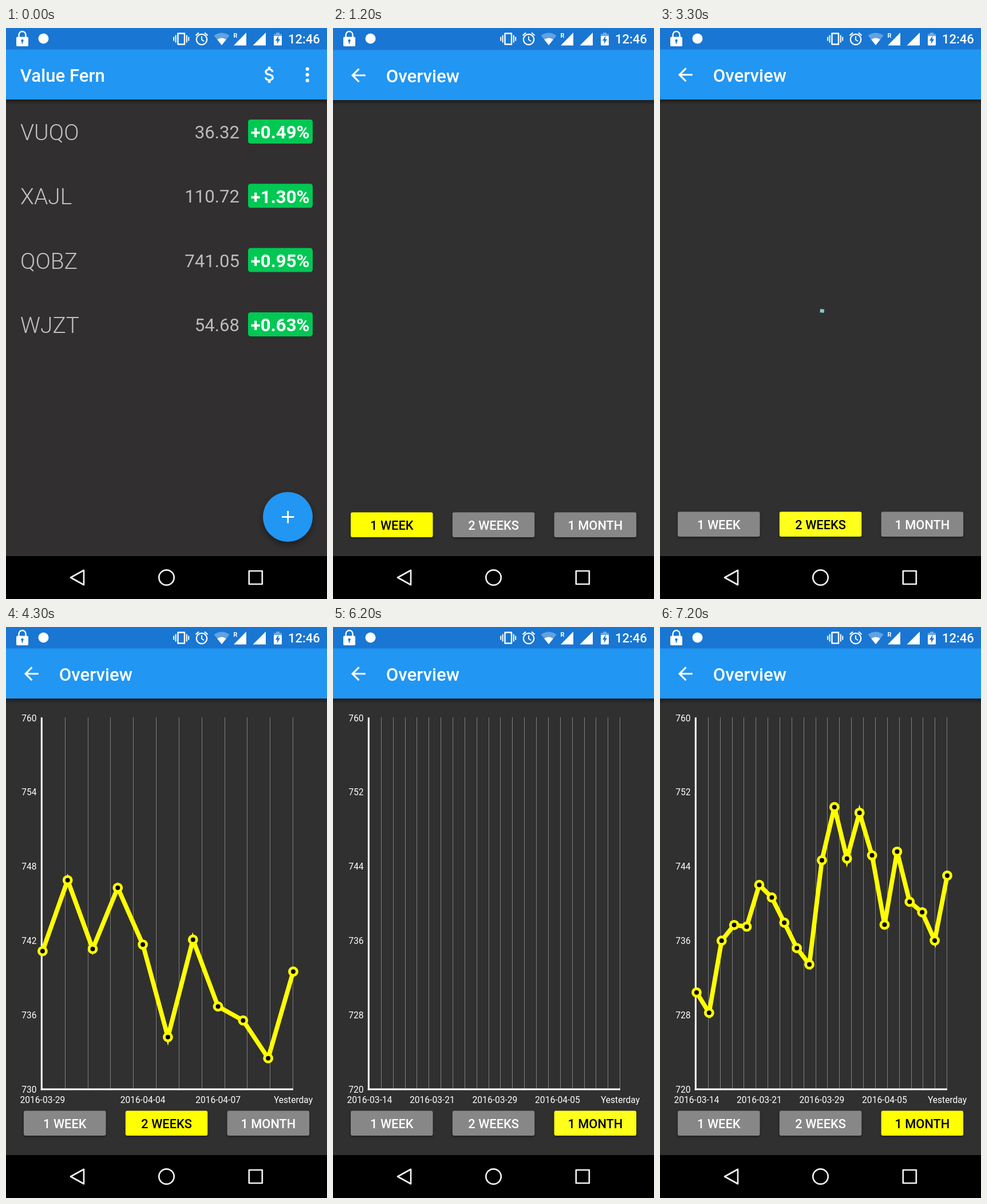
Recreate the animation shown at these times as an HTML page with a canvas. Size 561 by 998 pixels, loop 8000 ms.

```html
<!DOCTYPE html>
<html lang="en">
<head>
<meta charset="utf-8">
<title>Quote overview</title>
<style>
html, body { margin: 0; width: 561px; height: 998px; overflow: hidden; background: #303030; }
canvas { display: block; }
</style>
</head>
<body>
<canvas id="stage" width="561" height="998"></canvas>
<script>
const ctx = document.getElementById('stage').getContext('2d');
const W = 561, H = 998, LOOP = 8000, STEP = 100;
const BLUE = '#2196f3', DARK_BLUE = '#1976d2', YELLOW = '#ffff00', WHITE = '#fff';
const TOP = 159, BOTTOM = 808, RIGHT = 502;

const closes = [730.48, 728.29, 736.06, 737.75, 737.57, 742.07, 740.71, 738, 735.26, 733.5,
  744.72, 750.45, 744.9, 749.84, 745.25, 737.78, 745.65, 740.25, 739.12, 736.07, 743.07];

const stocks = [
  ['VUQO', '36.32', '+0.49%'],
  ['XAJL', '110.72', '+1.30%'],
  ['QOBZ', '741.05', '+0.95%'],
  ['WJZT', '54.68', '+0.63%']
];

// press: button tapped, axes: grid appears, rise: line starts moving
const ranges = [
  { name: '1 WEEK', press: 0, axes: 1300, rise: 1300, count: 6, left: 61.5, low: 730, high: 750,
    labels: { 0: 'Tue', 1: 'Wed', 2: 'Thu', 3: 'Fri', 4: 'Mon', 5: 'Yesterday' } },
  { name: '2 WEEKS', press: 3300, axes: 3600, rise: 3675, count: 11, left: 63.9, low: 730, high: 760,
    labels: { 0: '2016-03-29', 4: '2016-04-04', 7: '2016-04-07', 10: 'Yesterday' } },
  { name: '1 MONTH', press: 5900, axes: 6200, rise: 6350, count: 21, left: 63.9, low: 720, high: 760,
    labels: { 0: '2016-03-14', 5: '2016-03-21', 10: '2016-03-29', 15: '2016-04-05', 20: 'Yesterday' } }
];

const dollar = new Path2D('M11.8 10.9c-2.27-.59-3-1.2-3-2.15 0-1.09 1.01-1.85 2.7-1.85 1.78 0 2.44.85 2.5 2.1h2.21c-.07-1.72-1.12-3.3-3.21-3.81V3h-3v2.16c-1.94.42-3.5 1.68-3.5 3.61 0 2.31 1.91 3.46 4.7 4.13 2.5.6 3 1.48 3 2.41 0 .69-.49 1.79-2.7 1.79-2.06 0-2.87-.92-2.98-2.1h-2.2c.12 2.19 1.76 3.42 3.68 3.83V21h3v-2.15c1.95-.37 3.5-1.5 3.5-3.55 0-2.84-2.43-3.81-4.7-4.4z');
const arrow = new Path2D('M20 11H7.83l5.59-5.59L12 4l-8 8 8 8 1.41-1.41L7.83 13H20v-2z');

const clamp = v => Math.max(0, Math.min(1, v));
const quintInOut = p => p < 0.5 ? 16 * p ** 5 : 1 - 16 * (1 - p) ** 5;

function fastOutSlowIn(x) {
  let lo = 0, hi = 1;
  for (let i = 0; i < 20; i++) {
    const m = (lo + hi) / 2;
    const bx = 1.2 * m * (1 - m) ** 2 + 0.6 * m * m * (1 - m) + m ** 3;
    if (bx < x) lo = m; else hi = m;
  }
  return 3 * lo * lo - 2 * lo ** 3;
}

function rect(x, y, w, h, color) {
  ctx.fillStyle = color;
  ctx.fillRect(x, y, w, h);
}

function rounded(x, y, w, h, r, color) {
  ctx.fillStyle = color;
  ctx.beginPath();
  ctx.roundRect(x, y, w, h, r);
  ctx.fill();
}

function disc(x, y, r, color) {
  ctx.fillStyle = color;
  ctx.beginPath();
  ctx.arc(x, y, r, 0, Math.PI * 2);
  ctx.fill();
}

function ring(x, y, r, width) {
  ctx.lineWidth = width;
  ctx.beginPath();
  ctx.arc(x, y, r, 0, Math.PI * 2);
  ctx.stroke();
}

function trace(points, close) {
  ctx.beginPath();
  points.forEach(([x, y], i) => i ? ctx.lineTo(x, y) : ctx.moveTo(x, y));
  if (close) ctx.closePath();
}

function polygon(points, color) {
  ctx.fillStyle = color;
  trace(points, true);
  ctx.fill();
}

function line(width, ...points) {
  ctx.lineWidth = width;
  trace(points);
  ctx.stroke();
}

function text(s, x, y, size, weight, color, align = 'left') {
  ctx.font = `${weight} ${size}px Roboto, sans-serif`;
  ctx.fillStyle = color;
  ctx.textAlign = align;
  ctx.fillText(s, x, y);
}

function icon(path, x, y) {
  ctx.save();
  ctx.translate(x, y);
  ctx.scale(1.558, 1.558);
  ctx.fillStyle = WHITE;
  ctx.fill(path);
  ctx.restore();
}

function shadow(blur, dy, alpha) {
  ctx.shadowColor = `rgba(0,0,0,${alpha})`;
  ctx.shadowBlur = blur;
  ctx.shadowOffsetY = dy;
}

function noShadow() {
  ctx.shadowColor = 'transparent';
  ctx.shadowBlur = ctx.shadowOffsetY = 0;
}

function wedge(r, color) {
  ctx.fillStyle = color;
  ctx.beginPath();
  ctx.moveTo(377, 30);
  ctx.arc(377, 30, r, -Math.PI / 2 - 0.68, -Math.PI / 2 + 0.68);
  ctx.fill();
}

function statusBar() {
  ctx.strokeStyle = WHITE;
  // lock
  rounded(18, 15.5, 21, 16.5, 2, WHITE);
  ctx.lineWidth = 2.4;
  ctx.beginPath();
  ctx.moveTo(22.5, 16);
  ctx.lineTo(22.5, 12);
  ctx.arc(28.5, 12, 6, Math.PI, 0);
  ctx.lineTo(34.5, 16);
  ctx.stroke();
  disc(28.5, 22, 2.2, DARK_BLUE);
  rect(27.6, 22, 1.8, 5.5, DARK_BLUE);
  disc(65.5, 18.5, 9, WHITE);
  // vibrate
  ctx.lineWidth = 2.4;
  ctx.strokeRect(300.5, 9.5, 11.5, 19);
  for (const side of [-1, 1]) {
    line(2, [306.2 + side * 9.6, 12.5], [306.2 + side * 9.6, 25.5]);
    line(2, [306.2 + side * 13, 15.5], [306.2 + side * 13, 22.5]);
  }
  // alarm
  ring(342, 20, 9.2, 2.3);
  line(1.9, [342, 14.5], [342, 20.5], [346.2, 23.2]);
  line(2.3, [331.5, 13], [337, 8.3]);
  line(2.3, [352.5, 13], [347, 8.3]);
  // signal
  wedge(21.5, 'rgba(255,255,255,.32)');
  wedge(12.5, WHITE);
  text('R', 397.5, 17, 11, 700, WHITE);
  polygon([[398, 30.5], [420, 30.5], [420, 8]], WHITE);
  polygon([[431.5, 30.5], [454, 30.5], [454, 8]], WHITE);
  // battery
  rect(472, 8, 6, 3, 'rgba(255,255,255,.35)');
  rect(468, 10.5, 14, 4, 'rgba(255,255,255,.35)');
  rounded(468, 14, 14, 16.5, [0, 0, 1.5, 1.5], WHITE);
  polygon([[476.5, 13.5], [470.8, 22.3], [474.2, 22.3], [473.5, 28], [479.2, 19.4], [475.8, 19.4]], DARK_BLUE);
  text('12:46', 493, 27.3, 22, 500, WHITE);
}

function toolbar(title, x) {
  rect(0, 0, W, 38, DARK_BLUE);
  rect(0, 37.5, W, 87.5, BLUE);
  const fade = ctx.createLinearGradient(0, 125, 0, 134);
  fade.addColorStop(0, 'rgba(0,0,0,.4)');
  fade.addColorStop(1, 'rgba(0,0,0,0)');
  rect(0, 125, W, 9, fade);
  text(title, x, 93.6, 31.2, 500, WHITE);
}

function navBar() {
  rect(0, 923, W, 75, '#000');
  ctx.strokeStyle = '#f2f2f2';
  ctx.lineJoin = 'round';
  ctx.lineWidth = 2.7;
  trace([[113, 960.5], [136, 947.8], [136, 973.2]], true);
  ctx.stroke();
  ring(280.5, 960.5, 13.2, 2.7);
  ctx.lineWidth = 2.7;
  ctx.strokeRect(424.8, 949, 23, 23);
}

function listScreen() {
  rect(0, 0, W, H, '#312f30');
  toolbar('Value Fern', 24.8);
  icon(dollar, 442.2, 63);
  for (const y of [71.7, 81.7, 91.7]) disc(526.7, y, 3.1, WHITE);
  stocks.forEach(([name, price, change], i) => {
    const y = i * 112.3;
    text(name, 25, 196 + y, 39, 300, '#c2c1c2');
    text(price, 408, 193 + y, 31.2, 400, '#bdbcbd', 'right');
    rounded(423, 160 + y, 113, 42, 4.5, '#00c853');
    text(change, 479.2, 193.4 + y, 31.2, 700, WHITE, 'center');
  });
  shadow(12, 5, 0.4);
  disc(492.5, 854.5, 43.5, BLUE);
  noShadow();
  rect(482, 853.2, 21.5, 2.8, WHITE);
  rect(491.3, 844, 2.8, 21.5, WHITE);
}

function button(range, i, active, t) {
  const x = 31 + i * 177.8;
  shadow(4, 2, 0.4);
  rounded(x, 845.5, 143.5, 43.5, 3, active ? YELLOW : '#878787');
  noShadow();
  if (active && i && t < range.press + 400) rounded(x, 845.5, 143.5, 43.5, 3, 'rgba(250,250,250,.11)');
  text(range.name, x + 71.8, 875.8, 21.8, 500, active ? '#000' : WHITE, 'center');
}

function spinner(elapsed) {
  const cycle = elapsed / 1333;
  const sweep = 0.75 * fastOutSlowIn(clamp(cycle * 2));
  const from = Math.PI * 2 * (0.25 * cycle + elapsed * 2 / 4444 - 0.25);
  ctx.strokeStyle = '#80cbc4';
  ctx.lineWidth = 6.2;
  ctx.lineCap = 'square';
  ctx.beginPath();
  ctx.arc(280.5, 524, 29.7, from, from + 0.02 + Math.PI * 2 * sweep);
  ctx.stroke();
  ctx.lineCap = 'butt';
}

function axes(r) {
  const gap = (RIGHT - r.left) / r.count;
  for (let i = 1; i <= r.count; i++) {
    rect(Math.floor(r.left + gap * i - 0.4), 158, 1, BOTTOM - 158, '#808080');
  }
  const x = r.left - 1.6;
  rect(x - 1.5, 158, 3, BOTTOM - 156.5, WHITE);
  rect(x - 1.5, BOTTOM - 1.5, RIGHT - x + 1.5, 3, WHITE);
  for (let i = 0; i <= 5; i++) {
    const value = r.high - (r.high - r.low) * i / 5;
    text(value, r.left - 10.4, TOP + 5.6 + 129.8 * i, 15.6, 400, WHITE, 'right');
  }
  const step = (RIGHT - r.left) / (r.count - 1);
  for (const i in r.labels) text(r.labels[i], r.left + step * i, 832, 15.6, 400, WHITE, 'center');
}

function series(r, t) {
  const span = BOTTOM - TOP;
  const drop = span * (1 - quintInOut(clamp((t - r.rise) / 1000)));
  const points = closes.slice(-r.count).map((v, i) => [
    r.left + (RIGHT - r.left) * i / (r.count - 1),
    TOP + span * (r.high - v) / (r.high - r.low) + drop
  ]);
  ctx.save();
  ctx.beginPath();
  ctx.rect(0, 126, W, 710);
  ctx.clip();
  ctx.strokeStyle = YELLOW;
  ctx.lineJoin = 'miter';
  ctx.miterLimit = 4;
  line(7.8, ...points);
  for (const [x, y] of points) {
    disc(x, y, 8.9, YELLOW);
    disc(x, y, 4, '#000');
  }
  ctx.restore();
}

function overviewScreen(t) {
  const active = ranges.filter(r => t >= r.press).pop();
  rect(0, 0, W, H, '#303030');
  toolbar('Overview', 92.8);
  icon(arrow, 25.6, 63);
  ranges.forEach((r, i) => button(r, i, r === active, t));
  if (t >= active.axes) {
    axes(active);
    series(active, t);
  } else if (active.press) {
    spinner(t - active.press + 20);
  }
}

function draw(t) {
  const enter = t - 890;
  ctx.globalAlpha = 1;
  if (enter < 500) listScreen();
  if (enter >= 0) {
    ctx.save();
    ctx.translate(0, Math.round(80 * (1 - clamp(enter / 500)) ** 5));
    ctx.globalAlpha = 1 - (1 - clamp(enter / 250)) ** 2;
    overviewScreen(t);
    ctx.restore();
  }
  statusBar();
  navBar();
}

// the screen refreshes ten times a second
function tick() {
  const t = performance.now() % LOOP;
  draw(Math.floor(t / STEP) * STEP);
  requestAnimationFrame(tick);
}
tick();
</script>
</body>
</html>
```
